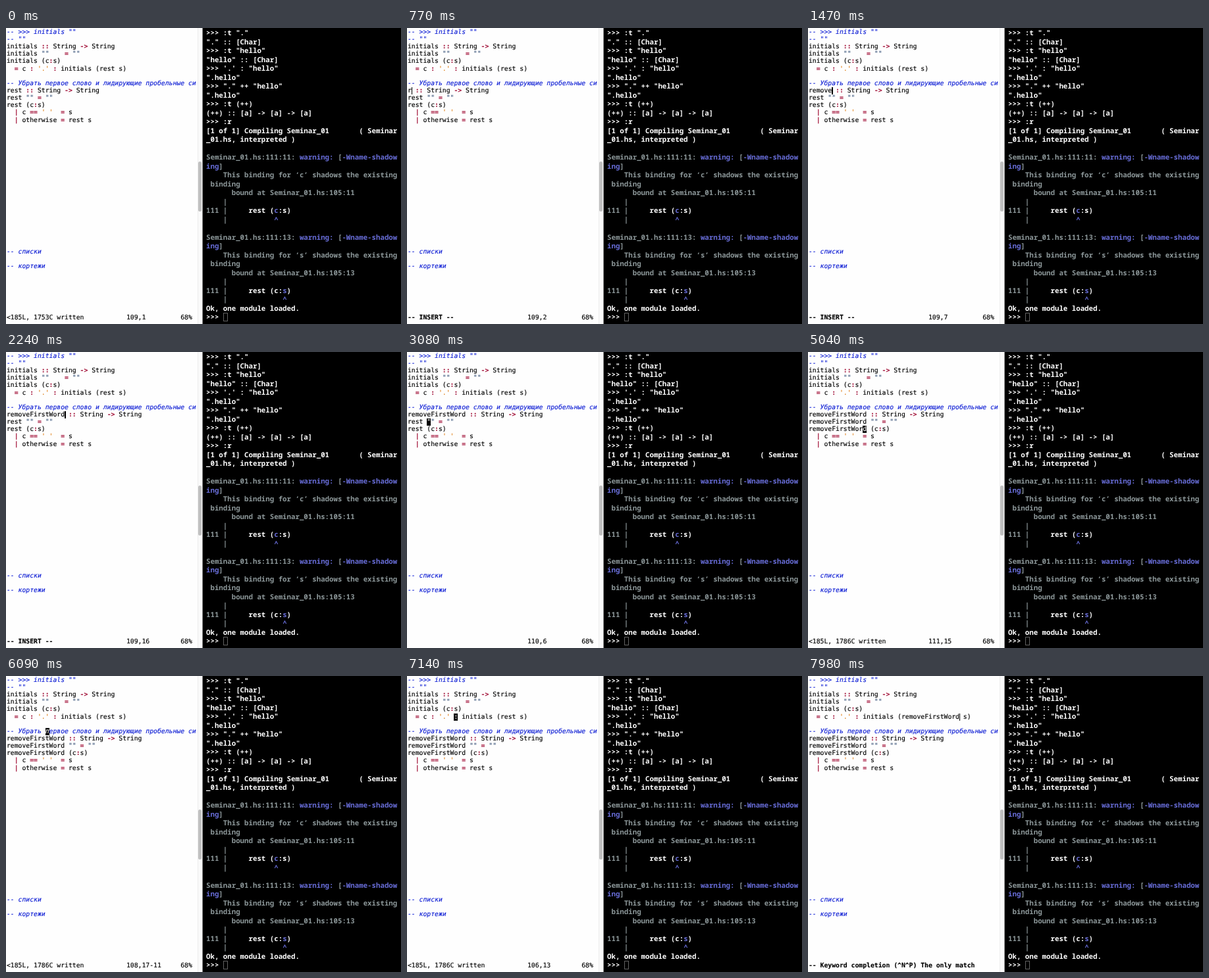
An HTML page that plays this animation: 600 px wide and 450 px high, repeating every 8000 ms.

```html
<!DOCTYPE html>
<html lang="en">
<head>
<meta charset="utf-8">
<title>Editor and interpreter</title>
<style>
html, body { margin: 0; width: 100%; height: 100%; overflow: hidden; }
#stage { position: relative; width: 600px; height: 450px; overflow: hidden; background: #fefefe; text-rendering: geometricPrecision; }
#stage div { position: absolute; white-space: pre; }
#editor { left: 0; top: 0; width: 291px; height: 450px; overflow: hidden; color: #000;
  font: 9.75px/11.135px "DejaVu Sans Mono", monospace; -webkit-text-stroke: .15px; }
#editor .row { left: 1px; height: 11.135px; }
.comment { color: #0c1cd4; font-style: italic; }
.op { color: #a5183e; font-weight: bold; }
.str { color: #3c567c; }
.chr { color: #e07c10; }
#cursor { height: 11.135px; background: #000; color: #fff; overflow: hidden; }
#track { left: 291px; top: 0; width: 7px; height: 450px; background: #fafafa; border-left: 1px solid #ececec; box-sizing: border-box; }
#thumb { left: 292px; top: 203px; width: 5px; height: 76px; border-radius: 3px; background: #c0c0c0; }
#shell { left: 299px; top: 0; width: 301px; height: 450px; background: #000; overflow: hidden; box-shadow: -1px 0 #888; }
#out { left: 5px; top: 2px; color: #fff; font: 600 10.75px/13.5px "Noto Sans Mono", monospace; }
#out b { color: #8c9799; font-weight: 700; }
#out i { color: #676cd6; font-style: normal; font-weight: 700; }
#prompt { left: 31px; top: 433px; width: 7px; height: 13px; border: 1px solid #606060; box-sizing: border-box; }
</style>
</head>
<body>
<div id="stage">
  <div id="editor"></div>
  <div id="track"></div>
  <div id="thumb"></div>
  <div id="shell"><div id="out"></div><div id="prompt"></div></div>
</div>
<script>
const LOOP = 8000, CW = 5.87, LH = 11.135, TOP = 0.9;
const FULL = 'removeFirstWord';
const MATCH = '-- Keyword completion (^N^P) The only match';

// "_" stands for the function name being renamed
const lines = [
  '-- >>> initials ""',
  '-- ""',
  'initials :: String -> String',
  'initials ""    = ""',
  'initials (c:s)',
  "  = c : '.' : initials (_ s)",
  '',
  '-- Убрать первое слово и лидирующие пробельные си',
  '_ :: String -> String',
  '_ "" = ""',
  '_ (c:s)',
  "  | c == ' '  = s",
  '  | otherwise = rest s'
];
lines[30] = '-- списки';
lines[32] = '-- кортежи';

const esc = s => s.replace(/&/g, '&amp;').replace(/</g, '&lt;').replace(/>/g, '&gt;');
const span = (cls, s) => `<span class="${cls}">${esc(s)}</span>`;

function paint(line) {
  if (line.startsWith('--')) return span('comment', line);
  return line.replace(/"[^"]*"|'.'|::|->|==|[=:|]/g, m =>
    span(m[0] === '"' ? 'str' : m[0] === "'" ? 'chr' : 'op', m));
}

// Editing session as a list of snapshots
const session = [];
let state = {
  row: 8, col: 0, mode: 'off', status: '<185L, 1753C written',
  words: { 5: 'rest', 8: 'rest', 9: 'rest', 10: 'rest' }
};
const snap = (t, change) => session.push({ ...(state = { ...state, ...change }), t });
const startOf = row => lines[row].indexOf('_');

function setWord(t, word, change) {
  const { row } = state;
  snap(t, { words: { ...state.words, [row]: word }, col: startOf(row) + word.length, ...change });
}
const insert = t => setWord(t, '', { mode: 'insert', status: '-- INSERT --' });
const type = (t, gap, text) => [...text].forEach((c, i) => setWord(t + i * gap, state.words[state.row] + c));
const complete = t => setWord(t, FULL, { status: MATCH });
const leave = t => snap(t, { mode: 'normal', col: state.col - 1, status: '' });
const move = (t, gap, row, ...cols) => cols.forEach((col, i) => snap(t + i * gap, { row, col }));
const command = (t, text) => snap(t, { mode: 'command', status: text });

snap(0, {});
snap(70, { mode: 'normal' });
insert(280);
type(770, 140, 'remove');
type(1610, 70, 'First');
type(2030, 70, 'Word');
leave(2450);
move(2730, 70, 9, 11, 10);
move(2940, 140, 9, 8, 5, 0);
insert(3360);
type(3500, 140, 're');
complete(3780);
leave(4060);
move(4200, 70, 10, 9, 8, 7, 6, 5, 0);
setWord(4690, FULL, { col: FULL.length - 1 });
command(4760, ':');
command(4900, ':w');
snap(4970, { mode: 'normal', status: '<185L, 1786C written' });
move(5390, 0, 9, 14);
move(5530, 0, 8, 14);
move(5670, 210, 7, 14, 10);
move(6370, 0, 6, 0);
move(6510, 420, 5, 10, 12);
move(7210, 70, 5, 14, 23, 24);
insert(7490);
type(7700, 140, 're');
complete(7980);

// Editor view
const editor = document.getElementById('editor');
function addRow(row) {
  const el = document.createElement('div');
  el.className = 'row';
  el.style.top = TOP + row * LH + 'px';
  return editor.appendChild(el);
}
const rowEls = lines.map((_, row) => addRow(row));
const statusEl = addRow(39), rulerEl = addRow(39), percentEl = addRow(39);
rulerEl.style.left = 1 + 31 * CW + 'px';
percentEl.style.left = 1 + 45 * CW + 'px';
const cursor = editor.appendChild(document.createElement('div'));
cursor.id = 'cursor';

const textOf = (s, row) => lines[row].replace('_', () => s.words[row]);

function ruler(s) {
  const line = textOf(s, s.row), n = s.row + 101;
  if (!line) return n + ',0-1';
  const byte = new TextEncoder().encode(line.slice(0, s.col)).length + 1;
  return n + ',' + byte + (byte > s.col + 1 ? '-' + (s.col + 1) : '');
}

function show(s) {
  rowEls.forEach((el, row) => { el.innerHTML = paint(textOf(s, row)); });
  const bare = s.mode === 'command' || s.status === MATCH;
  statusEl.textContent = s.status;
  statusEl.style.fontWeight = s.mode === 'insert' ? 'bold' : 'normal';
  rulerEl.textContent = bare ? '' : ruler(s);
  percentEl.textContent = bare ? '' : '68%';

  const block = s.mode === 'normal', cmd = s.mode === 'command';
  const row = cmd ? 39 : s.row, col = cmd ? s.status.length : s.col;
  cursor.style.display = s.mode === 'off' ? 'none' : 'block';
  cursor.style.left = 1 + col * CW + 'px';
  cursor.style.top = TOP + row * LH + 'px';
  cursor.style.width = (block ? CW : 1.5) + 'px';
  cursor.style.fontStyle = row === 7 ? 'italic' : 'normal';
  cursor.textContent = block ? textOf(s, row)[col] || '' : '';
}

// Interpreter output: <b> is grey, <i> is violet
const warning = (col, name, code, mark) => `
<b>Seminar_01.hs:111:${col}: <i>warning:</i> [<i>-Wname-shadow</i>
<i>ing</i>]
    This binding for ‘${name}’ shadows the existing
 binding
      bound at Seminar_01.hs:105:${col}
    |
111 |</b>     rest (${code})
    <b>|</b>${' '.repeat(mark)}<i>^</i>`;

document.getElementById('out').innerHTML = [
  esc(`>>> :t "."
"." :: [Char]
>>> :t "hello"
"hello" :: [Char]
>>> '.' : "hello"
".hello"
>>> "." ++ "hello"
".hello"
>>> :t (++)
(++) :: [a] -> [a] -> [a]
>>> :r
[1 of 1] Compiling Seminar_01       ( Seminar
_01.hs, interpreted )`),
  warning(11, 'c', '<i>c</i>:s', 11),
  warning(13, 's', 'c:<i>s</i>', 13),
  'Ok, one module loaded.',
  esc('>>> ')
].join('\n');

let shown;
function tick() {
  const t = performance.now() % LOOP;
  const now = session.filter(s => s.t <= t).pop();
  if (now !== shown) show(shown = now);
  requestAnimationFrame(tick);
}
tick();
</script>
</body>
</html>
```
